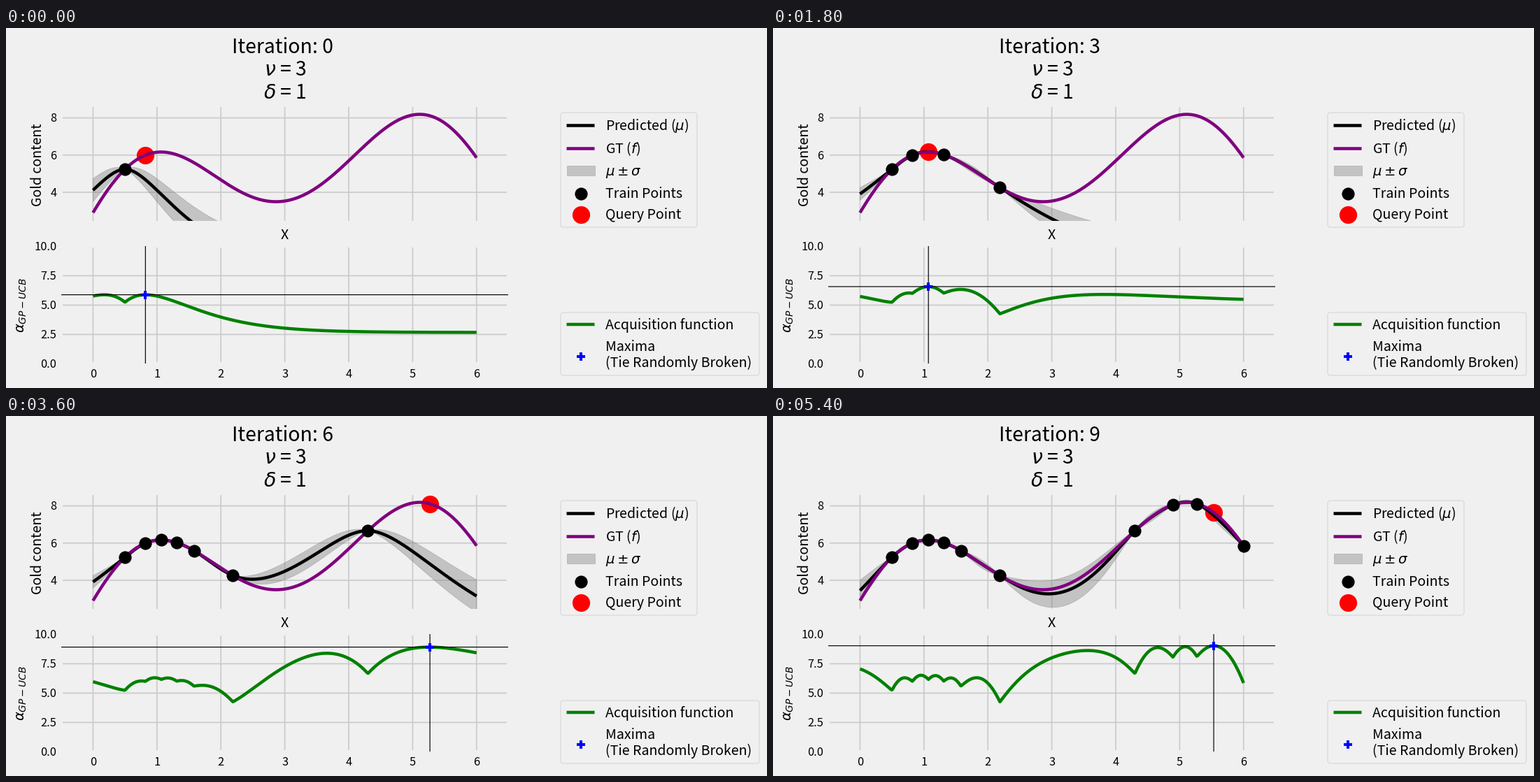
These frames come from a looping animation (1088x515 px, 6000 ms). A matplotlib script:

```python
import numpy as np
import matplotlib.pyplot as plt
from matplotlib.animation import FuncAnimation
from matplotlib.patches import FancyBboxPatch, Polygon, Rectangle

W, H, DPI = 1088, 515, 100
PX = 72 / DPI  # points per pixel
BG, GRID = "#f0f0f0", "#cbcbcb"
SMALL, MEDIUM, LARGE = 11.8, 14.1, 20.4
LINE, BAND = 4.5 * PX, dict(color="gray", alpha=0.4, lw=0.6)
ITERATIONS = 10
NU, DELTA = 3, 1

plt.rcParams["font.family"] = ["Noto Sans CJK JP", "DejaVu Sans"]
plt.rcParams["mathtext.fontset"] = "dejavusans"

# ---------------------------------------------------------------- model

KNOTS = np.array([
    (0, 2.9), (0.5, 5.248), (0.82, 5.995), (1.07, 6.17), (1.31, 6.005),
    (1.578, 5.6), (2.188, 4.263), (2.87, 3.485), (4, 5.71), (4.3, 6.647),
    (4.895, 8.056), (5.11, 8.2), (5.27, 8.115), (5.533, 7.643), (6, 5.855),
])
# Sample positions in the order in which they are queried.
PROBES = np.array([0.5, 0.82, 1.31, 2.188, 1.07, 1.578,
                   4.3, 5.27, 6, 4.895, 5.533])
xs = np.linspace(0, 6, 500)


def distance(a, b):
    return np.abs(np.subtract.outer(a, b))


def truth(x):
    def smooth(r):
        return np.exp(-0.5 * (r / 1.5) ** 2)

    kx, ky = KNOTS.T
    gram = smooth(distance(kx, kx)) + 3e-5 * np.eye(len(kx))
    return 5.5 + smooth(distance(x, kx)) @ np.linalg.solve(gram, ky - 5.5)


def matern(a, b, length):
    s = np.sqrt(3) * distance(a, b) / length
    return (1 + s) * np.exp(-s)


def gram_matrix(x, length):
    return matern(x, x, length) + 1e-9 * np.eye(len(x))


def log_likelihood(x, y, length):
    k = gram_matrix(x, length)
    return -0.5 * (y @ np.linalg.solve(k, y) + np.linalg.slogdet(k)[1])


def fit_length(x, y):
    lengths = np.geomspace(0.3, 6, 400)
    return lengths[np.argmax([log_likelihood(x, y, s) for s in lengths])]


def posterior(x, y, length, at):
    k = gram_matrix(x, length)
    cross = matern(at, x, length)
    mean = cross @ np.linalg.solve(k, y)
    var = 1 - np.sum(cross * np.linalg.solve(k, cross.T).T, axis=1)
    return mean, np.sqrt(np.clip(var, 0, None))


def ucb_weight(t):
    tau = 2 * np.log(t ** 2.5 * np.pi ** 2 / (3 * DELTA))
    return np.sqrt(NU * tau)


values = truth(PROBES)


def solve(i):
    x, y = PROBES[:i + 1], values[:i + 1]
    # The first and last models keep the starting length scale.
    length = 1.0 if i in (0, ITERATIONS - 1) else fit_length(x, y)
    at = np.append(xs, PROBES[i + 1])
    mean, sd = posterior(x, y, length, at)
    gain = mean + ucb_weight(i + 1) * sd
    return mean[:-1], sd[:-1], gain[:-1], gain[-1]


models = [solve(i) for i in range(ITERATIONS)]

# ---------------------------------------------------------------- stage

fig = plt.figure(figsize=(W / DPI, H / DPI), dpi=DPI, facecolor=BG)
LEFT, RIGHT = 79, 718
X0, X_UNIT = 124.4, 91.4


def x_pixel(x):
    return X0 + X_UNIT * x


def make_axes(top, bottom, y_ref, ref_pixel, unit, ticks, fmt):
    """Axes in a pixel box; value y_ref sits on ref_pixel."""
    ax = fig.add_axes([LEFT / W, 1 - bottom / H,
                       (RIGHT - LEFT) / W, (bottom - top) / H], facecolor=BG)
    ax.set_xlim((LEFT - X0) / X_UNIT, (RIGHT - X0) / X_UNIT)
    ax.set_ylim(y_ref - (bottom - ref_pixel) / unit,
                y_ref + (ref_pixel - top) / unit)
    ax.set_xticks(range(7))
    ax.set_yticks(ticks)
    ax.tick_params(length=0, labelbottom=False, labelleft=False)
    ax.grid(color=GRID, lw=1.25)
    plt.setp(ax.get_xgridlines() + ax.get_ygridlines(), snap=False)
    ax.set_axisbelow(True)
    for spine in ax.spines.values():
        spine.set(color=BG, linewidth=3)
    for v in ticks:
        label(72.5, ref_pixel + (y_ref - v) * unit + 5.9, fmt.format(v),
              SMALL, ha="right")
    return ax


stage = fig.add_axes([0, 0, 1, 1], zorder=5)
stage.set(xlim=(0, W), ylim=(H, 0))
stage.axis("off")


def label(x, y, text, size=MEDIUM, **kw):
    return stage.text(x, y, text, size=size, va="baseline", color="black",
                      rotation_mode="anchor", **kw)


top = make_axes(110.7, 278, 6, 181.8, 26.6, [4, 6, 8], "{}")
low = make_axes(312.2, 480.4, 5, 396.5, 16.82, [0, 2.5, 5, 7.5, 10], "{:.1f}")

for v in range(7):
    label(x_pixel(v), 500.2, str(v), SMALL, ha="center")
title = label(395.3, 36, "", LARGE, ha="center")
label(399, 68.5, rf"$\nu$ = {NU}", LARGE, ha="center")
label(399, 101, rf"$\delta$ = {DELTA}", LARGE, ha="center")
label(398.7, 302, "X", ha="center")
label(51, 196, "Gold content", ha="center", rotation=90)
label(27, 397, r"$\alpha_{GP-UCB}$", ha="center", rotation=90)

# ---------------------------------------------------------------- legends

KEY_X, TEXT_X, MID_X = (801.5, 841.5), 856.8, 821.5


def frame(x0, y0, x1, y1):
    stage.add_patch(FancyBboxPatch(
        (x0, y0), x1 - x0, y1 - y0, fc=BG, ec="#d2d2d2", lw=0.7,
        boxstyle="round,pad=0,rounding_size=3.9"))


def key_line(y, color):
    stage.plot(KEY_X, (y, y), color=color, lw=LINE, solid_capstyle="butt",
               snap=False)


DOT = dict(ls="", marker="o", color="black", ms=18.2 * PX, mew=0)
QUERY = dict(ls="", marker="o", color="red", ms=25.2 * PX, mew=0)
PLUS = dict(ls="", marker="P", color="blue", ms=12.5 * PX, mew=0)

frame(793, 121, 988, 285)
key_line(139.5, "black")
key_line(172.5, "purple")
stage.add_patch(Rectangle((KEY_X[0], 197), 40, 13.6, **BAND))
stage.plot(MID_X, 237, **DOT)
stage.plot(MID_X, 267, **QUERY)
for y, text in [(146.3, r"Predicted ($\mu$)"), (179.5, "GT ($f$)"),
                (211, r"$\mu \pm \sigma$"), (243.3, "Train Points"),
                (273.5, "Query Point")]:
    label(TEXT_X, y, text)

frame(793, 407, 1077, 497)
key_line(424, "green")
stage.plot(MID_X, 469.5, **PLUS)
for y, text in [(431, "Acquisition function"), (462, "Maxima"),
                (485.3, "(Tie Randomly Broken)")]:
    label(TEXT_X, y, text)

# ---------------------------------------------------------------- moving parts

curve = dict(lw=LINE, solid_capstyle="butt", zorder=2)
thin = dict(color="black", lw=0.85, zorder=3, snap=False)
band = top.add_patch(Polygon([(0, 0), (1, 0), (1, 1)], zorder=1, **BAND))
query, = top.plot([], [], zorder=1.5, **QUERY)
predicted, = top.plot([], [], color="black", **curve)
top.plot(xs, truth(xs), color="purple", **curve)
train, = top.plot([], [], zorder=4, **DOT)

acquisition, = low.plot([], [], color="green", **curve)
cross_v = low.axvline(0, **thin)
cross_h = low.axhline(0, **thin)
best, = low.plot([], [], zorder=4, clip_on=False, **PLUS)


def update(i):
    mean, sd, gain, peak = models[i]
    probe = PROBES[i + 1]
    title.set_text(f"Iteration: {i}")
    predicted.set_data(xs, mean)
    band.set_xy(np.column_stack([np.r_[xs, xs[::-1]],
                                 np.r_[mean + sd, (mean - sd)[::-1]]]))
    train.set_data(PROBES[:i + 1], values[:i + 1])
    query.set_data([probe], [values[i + 1]])
    acquisition.set_data(xs, gain)
    cross_v.set_xdata([probe, probe])
    cross_h.set_ydata([peak, peak])
    best.set_data([probe], [peak])
    return title, predicted, band, train, query, acquisition, best


update(0)
anim = FuncAnimation(fig, update, frames=ITERATIONS, interval=600,
                     repeat=True, repeat_delay=0)
plt.show()
```
